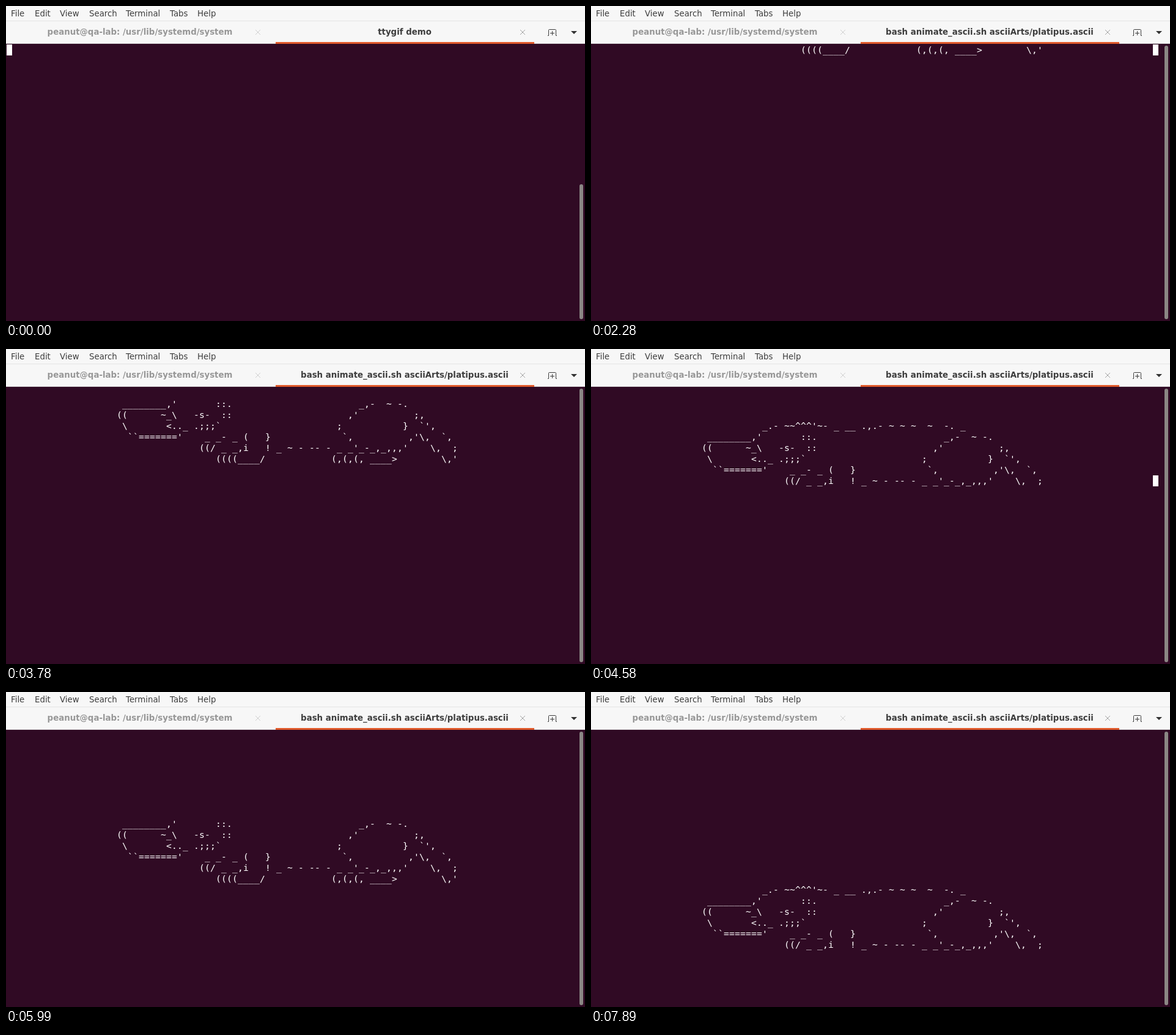
Animation of 947x516 px, one loop 8000 ms. Source, as an HTML page:

```html
<!DOCTYPE html>
<html lang="en">
<head>
<meta charset="utf-8">
<title>Terminal</title>
<style>
  html, body { margin: 0; width: 100%; height: 100%; overflow: hidden; background: #300a24; }
  svg, .ui, .term, #thumb, #cursor { position: absolute; }
  svg { left: 0; top: 0; }
  .ui, .term { white-space: pre; line-height: normal; }
  .ui { font-family: "DejaVu Sans", sans-serif; font-size: 13.333px; color: #3d3d3d; top: 5px; }
  .tab { top: 35px; font-weight: bold; text-align: center; }
  .idle { color: #979797; }
  .term { font-family: "DejaVu Sans Mono", monospace; font-size: 14.667px; letter-spacing: calc(9px - 1ch); color: #fff; }
  .user { font-weight: bold; color: #8ae234; }
  .path { font-weight: bold; color: #729fcf; }
  .icon { fill: none; stroke: #3d3d3d; }
  #thumb { left: 938px; width: 6px; border-radius: 3px; background: #8a8684; }
  #cursor { width: 9px; height: 18px; background: #fff; }
</style>
</head>
<body>
<svg width="947" height="62" viewBox="0 0 947 62">
  <rect width="947" height="62" fill="#f7f7f7"/>
  <path d="M0 24.5H947" stroke="#e4e4e4"/>
  <path d="M0 61.5H947" stroke="#d2d0d1"/>
  <rect x="441" y="59" width="423" height="3" fill="#e05a2b"/>
  <g class="icon">
    <path d="M408 39l8 8m0 -8l-8 8" stroke="#cfcfcf"/>
    <path d="M841 39l8 8m0 -8l-8 8" stroke="#a2a2a2"/>
    <path d="M886 48.5h1.5v-9q0 -1 1 -1h10q1 0 1 1v9h1.5M890 44.5h7M893.5 41v7"/>
    <path d="M924 41h10l-5 5z" fill="#333" stroke="none"/>
  </g>
</svg>

<div class="ui" style="left:8px">File</div>
<div class="ui" style="left:47px">Edit</div>
<div class="ui" style="left:88px">View</div>
<div class="ui" style="left:136px">Search</div>
<div class="ui" style="left:196px">Terminal</div>
<div class="ui" style="left:268px">Tabs</div>
<div class="ui" style="left:313px">Help</div>
<div class="ui tab idle" style="left:8px; width:422px">peanut@qa-lab: /usr/lib/systemd/system</div>
<div class="ui tab" id="title" style="left:441px; width:422px">ttygif demo</div>

<div id="thumb"></div>
<div id="cursor"></div>
<div class="term" id="prompt" style="left:1px; top:63px">(base) <span class="user">peanut@qa-lab</span>:<span class="path">~/demos/ascii-animator</span> (master)$ <span id="input"></span></div>

<script>
const LOOP = 8000;
const HOME = "peanut@qa-lab: ~/demos/ascii-animator";
const COMMAND = "bash animate_ascii.sh asciiArts/platipus.ascii";
const FALL = 2280, CYCLE = 3280;
const PAUSES = [[4480, 100], [5970, 10]];

// Digits stand for runs of spaces; every line starts at column 20.
const ART = [
  "11_.- ~~^^^'~- _ __ .,.- ~ ~ ~2~2-. _",
  "1________,'7::.23_,-2~ -.",
  "((6~_\\3-s-2::21,'10;,",
  "1\\7<.._ .;;;`21;11}2`',",
  "2``======='4_ _- _ (3}13`,10,'\\,2`,",
  "15((/ _ _,i3! _ ~ - -- - _ _'_-_,_,,,'4\\,2;",
  "18((((____/12(,(,(, ____>8\\,'"
].map(s => s.replace(/\d+/g, n => " ".repeat(n)));

const [title, thumb, cursor, prompt, input] =
  ["title", "thumb", "cursor", "prompt", "input"].map(id => document.getElementById(id));

const show = (el, on) => { el.style.visibility = on ? "visible" : "hidden"; };
const setText = (el, s) => { if (el.textContent !== s) el.textContent = s; };

function place(el, row, col) {
  el.style.left = 1 + 9 * col + "px";
  el.style.top = 63 + 18 * row + "px";
}

const lines = ART.map(s => {
  const el = document.createElement("div");
  el.className = "term";
  el.textContent = s;
  return document.body.appendChild(el);
});

function setCursor(row, col, on = true) {
  place(cursor, row, col);
  show(cursor, on);
}

// Lines first..last of the drawing, whose bottom line belongs on row `bottom`.
function setArt(bottom, first, last) {
  lines.forEach((el, i) => {
    const row = bottom - 6 + i;
    place(el, row, 20);
    show(el, row >= 0 && i >= first && i <= last);
  });
}

function drawShell(t) {
  const typed = t < 430 ? "" : t < 750 ? "l" : COMMAND;
  setArt(0, 7, 0);
  show(prompt, t >= 20 && t < 1870);
  setText(input, typed);
  if (t < 20 || t >= 1870) setCursor(0, 0);
  else if (t >= 1830) setCursor(1, 0);
  else setCursor(0, 54 + typed.length);
}

function drawFall(t) {
  show(prompt, false);
  if (t < CYCLE) {
    const row = Math.floor((t - FALL) / 200);
    setArt(row, 0, 6);
    setCursor(row, 102);
    return;
  }
  // Each row: 200 ms without the last line, then 100 ms without the first.
  const u = PAUSES.reduce(
    (s, [at, len]) => s - Math.min(Math.max(t - at, 0), len), t - CYCLE);
  const bottom = 5 + Math.floor(u / 300);
  const printing = u % 300 < 200;
  const blink = (t >= 4480 && t < 4580) || bottom >= 20;
  if (printing) setArt(bottom, 0, 5);
  else setArt(bottom, 1, 6);
  setCursor(bottom - 1, 102, printing && !blink);
}

function draw(t) {
  setText(title, t < 20 ? "ttygif demo" : t < 1830 ? HOME : COMMAND);
  const top = t < 1870 ? 292 : 65;
  thumb.style.top = top + "px";
  thumb.style.height = 513 - top + "px";
  if (t < FALL) drawShell(t);
  else drawFall(t);
}

let start;
function tick(now) {
  start ??= now;
  draw(Math.max(0, now - start) % LOOP);
  requestAnimationFrame(tick);
}
draw(0);
requestAnimationFrame(tick);
</script>
</body>
</html>
```
